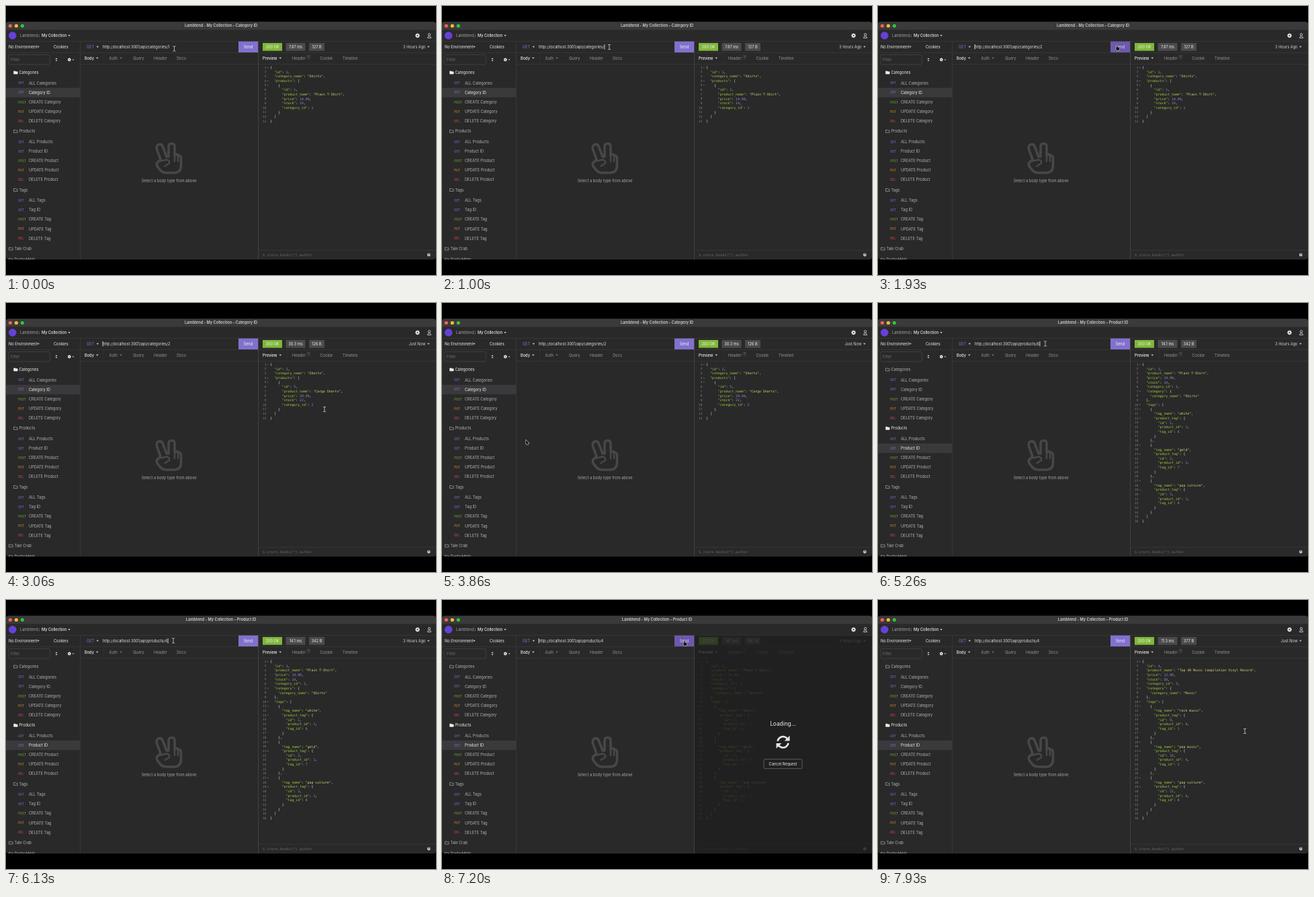
Animation of 640x400 px, one loop 8000 ms. Source, as an HTML page with a canvas:

```html
<!DOCTYPE html>
<html lang="en">
<head>
<meta charset="utf-8">
<title>API client</title>
<style>
html, body { margin: 0; width: 100%; height: 100%; overflow: hidden; background: #000; }
canvas { display: block; width: 640px; height: 400px; }
</style>
</head>
<body>
<canvas id="stage"></canvas>
<script>
const LOOP = 8000;
const UI = 'Inter, "Liberation Sans", sans-serif';
const MONO = '"DejaVu Sans Mono", monospace';
const BG = '#292929', LINE = '#3b3b3b', TEXT = '#c6c6c6', BRIGHT = '#efefef', DIM = '#969696';
const METHOD_COLORS = { GET: '#7d6bd0', POST: '#6da52b', PUT: '#d38422', DEL: '#c94848' };

const canvas = document.getElementById('stage');
const ratio = window.devicePixelRatio || 1;
canvas.width = 640 * ratio;
canvas.height = 400 * ratio;
const ctx = canvas.getContext('2d');

// ---------- drawing helpers ----------
function rect(x, y, w, h, color) {
  ctx.fillStyle = color;
  ctx.fillRect(x, y, w, h);
}

function roundRect(x, y, w, h, r) {
  ctx.beginPath();
  ctx.roundRect(x, y, w, h, r);
}

function dot(x, y, r, color) {
  ctx.fillStyle = color;
  ctx.beginPath();
  ctx.arc(x, y, r, 0, Math.PI * 2);
  ctx.fill();
}

// y is the middle of the capital letters.
function text(str, x, y, { color = TEXT, size = 5.65, weight = 400, align = 'left', font = UI } = {}) {
  ctx.font = `${weight} ${size}px ${font}`;
  ctx.textAlign = align;
  ctx.fillStyle = color;
  ctx.fillText(str, x, y + size * 0.364);
}

function path(d, { x = 0, y = 0, fill, stroke, width = 1 }) {
  const shape = new Path2D(d);
  ctx.save();
  ctx.translate(x, y);
  ctx.lineJoin = ctx.lineCap = 'round';
  if (stroke) {
    ctx.strokeStyle = stroke;
    ctx.lineWidth = width;
    ctx.stroke(shape);
  }
  if (fill) {
    ctx.fillStyle = fill;
    ctx.fill(shape);
  }
  ctx.restore();
}

function caretDown(x, y, color = TEXT, r = 1.8) {
  path(`M${-r} ${-r / 2}H${r}L0 ${r / 2 + 0.3}Z`, { x, y, fill: color });
}

function gear(x, y, r, color) {
  ctx.strokeStyle = color;
  ctx.lineWidth = r * 0.45;
  ctx.beginPath();
  for (let i = 0; i < 8; i++) {
    const a = i * Math.PI / 4;
    ctx.moveTo(x + Math.cos(a) * r * 0.6, y + Math.sin(a) * r * 0.6);
    ctx.lineTo(x + Math.cos(a) * r, y + Math.sin(a) * r);
  }
  ctx.stroke();
  ctx.lineWidth = r * 0.5;
  ctx.beginPath();
  ctx.arc(x, y, r * 0.55, 0, Math.PI * 2);
  ctx.stroke();
}

// ---------- data ----------
const tag = (name, id, product, tagId) => ({
  tag_name: name,
  product_tag: { id, product_id: product, tag_id: tagId }
});

function category(id, name, product) {
  return { id, category_name: name, products: [{ ...product, category_id: id }] };
}

function product(id, name, price, stock, catId, catName, tags) {
  return {
    id, product_name: name, price, stock, category_id: catId,
    category: { category_name: catName }, tags
  };
}

const response = (time, size, age, body) =>
  ({ time, size, age, lines: JSON.stringify(body, null, 2).split('\n') });

const SHIRTS = response('7.87 ms', '127 B', '3 Hours Ago', category(1, 'Shirts',
  { id: 1, product_name: 'Plain T-Shirt', price: 14.99, stock: 14 }));
const SHORTS = response('30.3 ms', '126 B', 'Just Now', category(2, 'Shorts',
  { id: 5, product_name: 'Cargo Shorts', price: 29.99, stock: 22 }));
const TSHIRT = response('14.1 ms', '342 B', '3 Hours Ago',
  product(1, 'Plain T-Shirt', 14.99, 14, 1, 'Shirts',
    [tag('white', 1, 1, 6), tag('gold', 2, 1, 7), tag('pop culture', 3, 1, 8)]));
const RECORD = response('11.3 ms', '377 B', 'Just Now',
  product(4, 'Top 40 Music Compilation Vinyl Record', 12.99, 50, 3, 'Music',
    [tag('rock music', 9, 4, 1), tag('pop music', 10, 4, 2), tag('pop culture', 11, 4, 8)]));

const FOLDERS = [
  { name: 'Categories', one: 'Category', y: 99 },
  { name: 'Products', one: 'Product', y: 186.3 },
  { name: 'Tags', one: 'Tag', y: 273.5 }
];

// ---------- timeline ----------
const SWITCH = 4130;
const SENDS = [1860, 7130];
const LOADS = [[2000, 2130], [7200, 7330]];
const FOCUS = [270, 5200];

const POINTER = [
  [0, 250.5, 63.5], [600, 249, 61], [1330, 249, 61], [1860, 356, 60],
  [2400, 356, 60], [3060, 474, 158], [3260, 474, 158], [4060, 62, 216],
  [4200, 62, 216], [4930, 249, 60.5], [6400, 249, 60.5], [7060, 361, 62],
  [7330, 361, 62], [7900, 546, 195]
];

function pointerAt(t) {
  const next = POINTER.findIndex(p => p[0] > t);
  if (next < 0) return POINTER[POINTER.length - 1].slice(1);
  const [t0, x0, y0] = POINTER[next - 1];
  const [t1, x1, y1] = POINTER[next];
  const p = (t - t0) / (t1 - t0);
  const e = p * p * (3 - 2 * p);
  return [x0 + (x1 - x0) * e, y0 + (y1 - y0) * e];
}

function stateAt(t) {
  const onProduct = t >= SWITCH;
  let id;
  if (onProduct) id = t < 5860 ? '6' : t < 6130 ? '' : '4';
  else id = t < 1000 ? '1' : t < 1200 ? '' : '2';

  const [first, second] = LOADS;
  const result = t < first[1] ? SHIRTS : t < SWITCH ? SHORTS : t < second[1] ? TSHIRT : RECORD;
  return {
    onProduct,
    url: `http://localhost:3001/api/${onProduct ? 'products' : 'categories'}/${id}`,
    result,
    loading: LOADS.some(([from, to]) => t >= from && t < to),
    caret: caretAt(t, onProduct),
    fading: onProduct && t < 4930,
    pointer: pointerAt(t)
  };
}

function caretAt(t, onProduct) {
  const i = onProduct ? 1 : 0;
  if (t < FOCUS[i]) return null;
  const typed = onProduct ? [5860, 6130] : [1000, 1200];
  const sent = t >= SENDS[i];
  const since = sent ? SENDS[i] : Math.max(FOCUS[i], ...typed.filter(k => k <= t));
  if ((t - since) % 1060 >= 530) return null;
  return sent ? 'start' : 'end';
}

// ---------- parts ----------
function drawFrame(s) {
  rect(0, 0, 640, 400, '#000');
  ctx.fillStyle = BG;
  roundRect(0, 23.5, 640, 353.5, 4);
  ctx.fill();
  ctx.fillStyle = '#3b3a3b';
  roundRect(0, 23.5, 640, 12, [4, 4, 0, 0]);
  ctx.fill();
  ['#fc5f57', '#fdbc2e', '#2ac73f'].forEach((c, i) => dot(6.3 + i * 9, 29.5, 2.6, c));
  text(`Lambtend - My Collection – ${s.onProduct ? 'Product' : 'Category'} ID`, 320, 29.3,
    { weight: 600, align: 'center', color: '#cfcfcf' });

  dot(9.7, 44, 5.8, '#6541d8');
  text('Lambtend', 21, 44, { color: '#a5a5a5' });
  text('/', 48.5, 44, { color: DIM });
  text('My Collection', 53, 44, { color: BRIGHT, weight: 500 });
  caretDown(94, 44);
  gear(612.5, 44, 3.3, '#e6e6e6');
  path('M-2.5 3.2Q-2.3 .7 0 .7T2.5 3.2Z', { x: 630, y: 44, stroke: '#dedede', width: 0.8 });
  ctx.strokeStyle = '#dedede';
  ctx.beginPath();
  ctx.arc(630, 42.5, 1.7, 0, 7);
  ctx.lineWidth = 0.8;
  ctx.stroke();

  rect(0, 52, 640, 0.7, LINE);
  rect(0, 69, 110, 0.7, LINE);
}

function drawFolder(x, y, open) {
  path('M-2.6 -2H-.5L.3 -1.2H2.6V2H-2.6Z',
    { x, y, stroke: open ? BRIGHT : '#aaa', width: 0.7, fill: open ? BRIGHT : null });
}

function drawSidebar(s) {
  text('No Environment', 4, 60.7, { color: BRIGHT });
  caretDown(48, 60.7);
  text('Cookies', 71, 60.7, { color: BRIGHT });

  ctx.strokeStyle = '#484848';
  ctx.lineWidth = 0.7;
  roundRect(3.8, 72.5, 61.5, 14.5, 1.5);
  ctx.stroke();
  text('Filter', 7, 79.8, { color: '#6e6e6e' });
  path('M-1.5 -.7L0 -2.5L1.5 -.7ZM-1.5 .7L0 2.5L1.5 .7Z', { x: 75, y: 79.8, fill: BRIGHT });
  gear(94.3, 79.8, 2.5, BRIGHT);
  caretDown(100, 80, TEXT, 1.4);

  ctx.save();
  ctx.beginPath();
  ctx.rect(0, 88, 110, 289);
  ctx.clip();

  const activeY = s.onProduct ? 216 : 128.7;
  rect(0, activeY - 7, 110, 14, '#3a3a3c');
  if (s.fading) rect(0, activeY - 7, 1, 14, '#8171cc');
  else if (!s.onProduct && s.pointer[0] < 110 && Math.abs(s.pointer[1] - 216) < 7) {
    rect(0, 209, 110, 14, '#313132');
  }

  FOLDERS.forEach((folder, i) => {
    const open = i === (s.onProduct ? 1 : 0);
    const lit = open || (s.fading && i === 0);
    drawFolder(14.5, folder.y, open);
    text(folder.name, 19.5, folder.y, { color: lit ? BRIGHT : '#b5b5b5' });
    const rows = [
      ['GET', `ALL ${folder.name}`], ['GET', `${folder.one} ID`],
      ['POST', `CREATE ${folder.one}`], ['PUT', `UPDATE ${folder.one}`],
      ['DEL', `DELETE ${folder.one}`]
    ];
    rows.forEach(([method, label], j) => {
      const y = folder.y + 15.5 + j * 14.15;
      text(method, 18.3, y + 0.2, { color: METHOD_COLORS[method], size: 4.25, weight: 500 });
      text(label, 34, y, { color: lit && j === 1 ? BRIGHT : '#b5b5b5' });
    });
  });
  ['Tale Crab', 'Dusty/Hints'].forEach((name, i) => {
    const y = 361 + i * 16.2;
    drawFolder(7.5, y, false);
    text(name, 12.5, y, { color: '#b5b5b5' });
  });
  ctx.restore();
  rect(110, 52, 0.8, 325, LINE);
}

function drawRequest(s) {
  const [px, py] = s.pointer;
  const hover = px > 346 && px < 375 && py > 53 && py < 69;

  text('GET', 120, 60.7, { color: '#8171d2' });
  caretDown(136.3, 60.7);
  text(s.url, 144, 60.7, { color: '#e2e2e2' });
  if (s.caret) {
    const x = s.caret === 'start' ? 143.7 : 144.5 + ctx.measureText(s.url).width;
    rect(x, 57, 0.8, 7.5, '#f2f2f2');
  }
  rect(346, 52.7, 29.3, 16.3, hover ? '#6c59ad' : '#8171cc');
  text('Send', 360.5, 60.7, { align: 'center', color: hover ? '#d8d2ee' : '#f4f2ff' });

  rect(110.8, 69, 264.7, 0.7, LINE);
  rect(110.8, 86, 264.7, 0.7, LINE);
  rect(145, 69, 0.7, 17, '#343434');
  text('Body', 117, 77.5, { color: BRIGHT, weight: 500 });
  caretDown(135.8, 77.5);
  text('Auth', 153.5, 77.5, { color: DIM });
  caretDown(171, 77.5, '#777');
  [['Query', 189], ['Header', 220], ['Docs', 254.3]].forEach(([label, x]) =>
    text(label, x, 77.5, { color: DIM }));

  drawPeaceHand();
  text('Select a body type from above', 242.6, 260.3, { align: 'center', color: '#a9a9a9' });
  rect(375.2, 52, 0.9, 325, '#454545');
}

function drawPeaceHand() {
  const color = '#474747';
  path('M230 228L224.5 213Q223 207 228 205.8Q232 205 233.5 209.5L239 224H242V209' +
    'Q242 204.5 246.5 204.5T251 209V222Q254 219.5 256.5 222Q260.5 222 260.5 227V237' +
    'Q260.5 248 250 248H238Q233 248 230 244.5L225.5 239Q222.5 234 227 231Z',
    { stroke: color, width: 3.6 });
  path('M228 231L239 228.5Q244 229.5 243 234L236.5 238M251 223V231M256 224V231',
    { stroke: color, width: 2.6 });
}

function drawCode(lines) {
  const style = { size: 4.85, font: MONO };
  ctx.font = `4.85px ${MONO}`;
  const advance = ctx.measureText('0').width;
  const token = /("[^"]*"(?=:))|("[^"]*")|(\d[\d.]*)|[^\s]/g;
  lines.forEach((line, i) => {
    const y = 91.2 + i * 6.66;
    text(String(i + 1), 387.3, y, { ...style, size: 4.4, align: 'right', color: '#858585' });
    if (/[{[]$/.test(line)) caretDown(389.8, y + 0.2, '#858585', 1);
    for (const m of line.matchAll(token)) {
      const color = m[1] ? '#a2cd45' : m[2] ? '#e2da7c' : m[3] ? '#9688dc' : '#dedede';
      text(m[0], 393.3 + m.index * advance, y, { ...style, color });
    }
  });
}

function badge(label, x, w, color) {
  rect(x, 55, w, 11.7, color);
  text(label, x + w / 2, 60.8, { align: 'center', color: '#f0f0f0' });
}

function drawResponse(s) {
  const { time, size, age, lines } = s.result;
  badge('200 OK', 382, 29, '#7fb73a');
  badge(time, 416.5, 29, '#4b4b4b');
  badge(size, 451, 23, '#4b4b4b');
  text(age, 624.5, 60.7, { align: 'right', color: '#d2d2d2' });
  caretDown(628.8, 60.7);

  rect(376, 69, 264, 0.7, LINE);
  rect(376, 86, 264, 0.7, LINE);
  rect(418.5, 69, 0.7, 17, '#343434');
  text('Preview', 382, 77.5, { color: BRIGHT, weight: 500 });
  caretDown(408.3, 77.5);
  [['Header', 426], ['Cookie', 467.5], ['Timeline', 501]].forEach(([label, x]) =>
    text(label, x, 77.5, { color: DIM }));
  ctx.strokeStyle = '#5a5a5a';
  ctx.lineWidth = 0.5;
  roundRect(447.7, 73, 5, 5.6, 1.5);
  ctx.stroke();
  text('7', 450.2, 75.8, { size: 3.8, align: 'center', color: '#b0b0b0' });

  drawCode(lines);

  rect(376, 362.7, 264, 0.7, LINE);
  text('$.store.books[*].author', 382, 370, { size: 5.35, font: MONO, color: '#666' });
  dot(629.3, 370, 2.4, '#c2c2c2');
  text('?', 629.3, 370, { size: 4, weight: 700, align: 'center', color: BG });

  if (s.loading) drawLoading();
}

function drawLoading() {
  rect(376, 52.7, 264, 324.3, 'rgba(30,30,30,0.8)');
  text('Loading...', 507.5, 184.3, { size: 8.3, align: 'center', color: '#ededed' });

  ctx.save();
  ctx.translate(507.5, 211.3);
  for (let i = 0; i < 2; i++) {
    ctx.strokeStyle = '#e6e6e6';
    ctx.lineWidth = 2.7;
    ctx.lineCap = 'butt';
    ctx.beginPath();
    ctx.arc(0, 0, 8.2, Math.PI * 1.06, Math.PI * 1.8);
    ctx.stroke();
    path('M10 -9.5V-1.7H2.2Z', { fill: '#e6e6e6' });
    ctx.rotate(Math.PI);
  }
  ctx.restore();

  ctx.strokeStyle = '#777';
  ctx.lineWidth = 0.7;
  roundRect(479, 236.7, 57, 14, 1.5);
  ctx.stroke();
  text('Cancel Request', 507.5, 243.8, { align: 'center', color: '#ededed' });
}

function drawPointer([x, y]) {
  const overUrl = x > 143 && x < 346 && y > 52 && y < 69;
  const overCode = x > 376 && y > 86;
  const overSend = x >= 346 && x < 375 && y < 69;
  if (overUrl || overCode) {
    const beam = 'M-1.8 -3.8Q0 -3.8 0 -2.8Q0 -3.8 1.8 -3.8M0 -2.8V2.8M-1.8 3.8Q0 3.8 0 2.8Q0 3.8 1.8 3.8';
    path(beam, { x, y, stroke: '#111', width: 1.7 });
    path(beam, { x, y, stroke: '#eee', width: 0.8 });
  } else if (overSend) {
    path('M-.9 -2.5Q-.2 -3.5 .5 -2.5V0L3 .7Q3.8 1 3.5 2.2L2.8 5H-.3L-2.4 2Q-2.4 .8 -.9 1.5Z',
      { x, y: y + 1, stroke: '#f4f4f4', width: 1, fill: '#161616' });
  } else {
    path('M0 -3.3V3.2L1.5 1.9L2.6 4.2L3.6 3.7L2.6 1.5H4.6Z',
      { x: x - 1, y, stroke: '#e8e8e8', width: 0.9, fill: '#111' });
  }
}

function render() {
  const state = stateAt(performance.now() % LOOP);
  ctx.setTransform(ratio, 0, 0, ratio, 0, 0);
  drawFrame(state);
  drawSidebar(state);
  drawRequest(state);
  drawResponse(state);
  drawPointer(state.pointer);
  requestAnimationFrame(render);
}
render();
</script>
</body>
</html>
```
